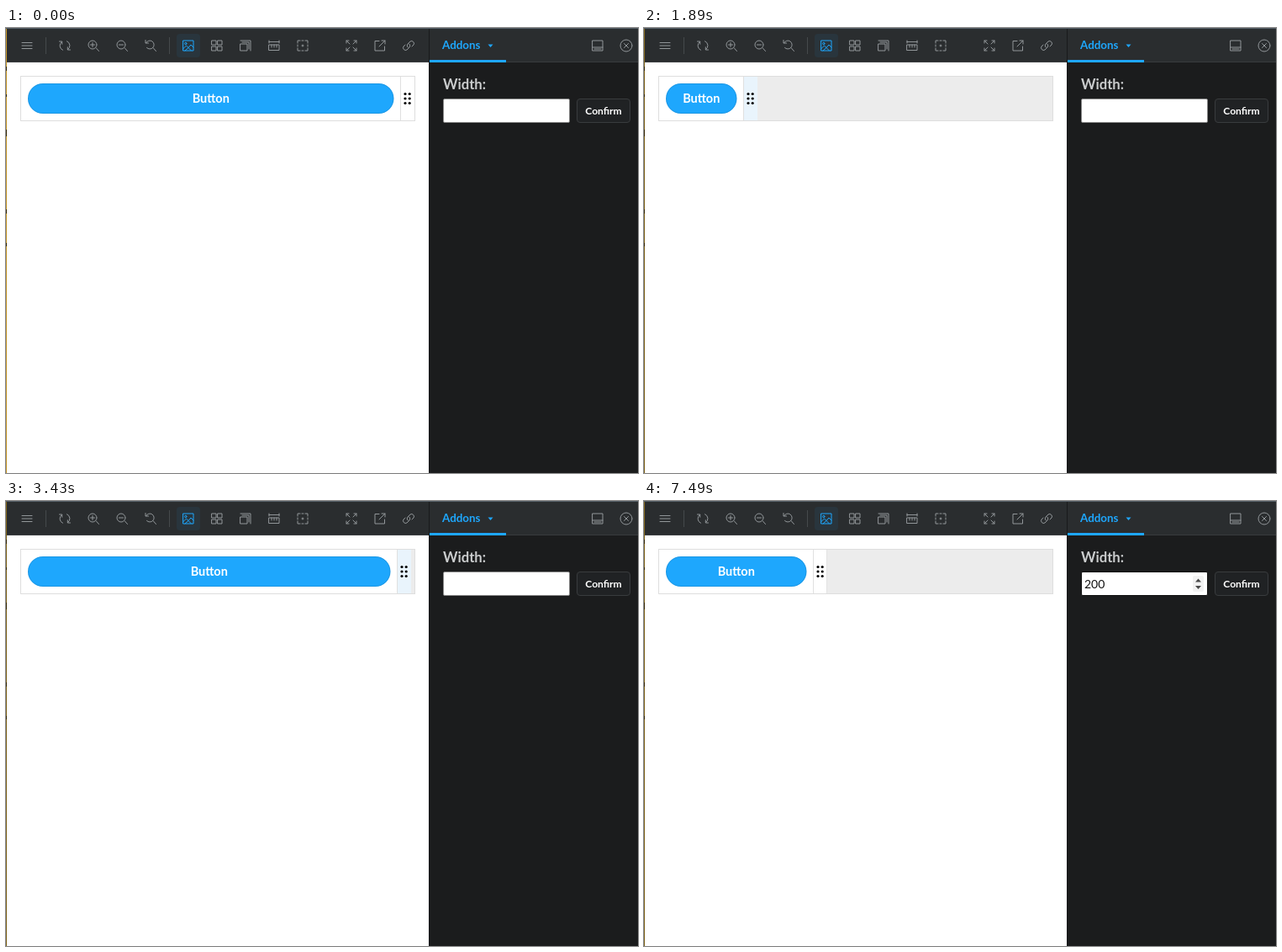
These frames come from a looping animation (752x530 px, 8000 ms). An HTML page:

```html
<!DOCTYPE html>
<html lang="en">
<head>
<meta charset="utf-8">
<title>Resizable button</title>
<style>
  html, body { margin: 0; width: 100%; height: 100%; overflow: hidden; background: #1b1c1d; }
  svg { display: block; width: 752px; height: 530px; }
  text { font-family: Lato, "Open Sans", sans-serif; font-weight: 700; }
  .icon { fill: none; stroke: #92979a; stroke-width: 1; stroke-linecap: round; stroke-linejoin: round; }
  .active { stroke: #1ea7fd; }
</style>
</head>
<body>
<svg viewBox="0 0 752 530">
  <rect width="752" height="530" fill="#1b1c1d"/>
  <rect width="752" height="40" fill="#2a2d2f"/>
  <rect width="752" height="1" fill="#535d65"/>
  <rect x="503" y="40" width="249" height="1" fill="#383b3d"/>
  <rect y="41" width="503" height="489" fill="#fff"/>
  <rect y="40" width="503" height="1" fill="#3d4042"/>
  <rect x="503" y="1" width="1" height="529" fill="#181a1b"/>
  <g id="edge">
    <rect id="strip" y="1" width="1" height="529"/>
    <path d="M.5 46v5m0 28v3m0 39v8m0 87v5m0 35v4" stroke="#3a2c08"/>
  </g>

  <path d="M47.500 11v20M194.500 11v20" stroke="#45494c"/>
  <rect x="203" y="7" width="28" height="28" rx="4" fill="#1ea7fd" fill-opacity=".07"/>
  <g id="icons"></g>

  <text x="519" y="25" font-size="13.400" fill="#1ea7fd">Addons</text>
  <path d="M573.500 19.500h6l-3 3.500z" fill="#1ea7fd"/>
  <rect x="504" y="38" width="91" height="3" fill="#1ea7fd"/>
  <text x="520" y="73" font-size="16.700" fill="#cbcdce">Width:</text>

  <rect x="17.500" y="57.500" width="469" height="53" fill="#ececec" stroke="#dedede"/>
  <rect id="box" x="18" y="58" height="52" fill="#fff"/>
  <g id="handle">
    <rect id="grip" x=".5" y="58" width="16.500" height="52"/>
    <path d="M.5 58v52" stroke="#e0e0e0"/>
    <path id="gripEnd" d="M16.500 58v52" stroke="#e2e2e2"/>
    <g id="dots"></g>
  </g>
  <rect id="button" x="26" y="66" height="36" rx="18" fill="#1ea7fd"/>
  <rect id="buttonRim" x="26.500" y="66.500" height="35" rx="17.500" fill="none" stroke="#000" stroke-opacity=".1"/>
  <text id="label" y="89" font-size="14.500" font-weight="800" fill="#fff" text-anchor="middle">Button</text>

  <rect id="field" x="520.500" y="84.500" width="150" height="28" rx="1.500" fill="#fff"/>
  <g id="spinner">
    <rect x="653" y="89" width="13" height="19" rx="2" fill="#f2f2f2"/>
    <path d="M656 96.500l3.500-4 3.500 4zM656 101l3.500 4 3.500-4z" fill="#4a4a4a"/>
  </g>
  <text id="value" x="524" y="103.500" font-size="14" style="font-weight:400" fill="#111"></text>
  <path id="caret" d="M.5 90v18" stroke="#000"/>
  <path id="beam" d="M607.500 94.500q3 0 3 2q0-2 3-2M610.500 96v12M607.500 109q3 0 3-2q0 2 3 2M609 103.500h3" fill="none" stroke="#111" stroke-width="1.200"/>

  <rect x="679.500" y="84.500" width="63" height="28" rx="3.500" fill="#202224" stroke="#393c3e"/>
  <text x="711" y="103" font-size="12.100" fill="#fff" text-anchor="middle">Confirm</text>
</svg>
<script>
const LOOP = 8000, TICK = 70;
const $ = id => document.getElementById(id);
const set = (id, attrs) => Object.entries(attrs).forEach(([k, v]) => $(id).setAttribute(k, v));
const show = (id, on) => set(id, { visibility: on ? 'visible' : 'hidden' });

// Toolbar icons, each drawn around its own centre.
const lens = 'M3.200 2.800L6.500 6.500M4-1A5 5 0 1 1-6-1A5 5 0 1 1 4-1';
const square = (x, y, s) => `M${x} ${y}h${s}v${s}h${-s}z`;
const icons = [
  [25, 'M-6-3.500H6M-6 0H6M-6 3.500H6'],
  [70, 'M-2.500 5.300A5.800 5.800 0 0 1-3.500-4.700M-6.500-5h3.200v3.200M2.500-5.300A5.800 5.800 0 0 1 3.500 4.700M6.500 5H3.300V1.800'],
  [104, lens + 'M-3.500-1H1.500M-1-3.500V1.500'],
  [138, lens + 'M-3.500-1H1.500'],
  [172, 'M3.200 2.800L6.500 6.500M-5.400-3.200A5 5 0 1 1-4.500 2.500M-6-6.500v3.500h3.500'],
  [217, square(-6, -6, 12) + 'M-6 3.500L-2.500 0L0 2.500L3-1L6 2M-2-2.500a1.200 1.200 0 1 1-2.400 0a1.200 1.200 0 1 1 2.400 0M-4 6L0 2.500L3.500 6'],
  [251, [[-6, -6], [1, -6], [-6, 1], [1, 1]].map(([x, y]) => square(x, y, 5)).join('')],
  [285, square(-6, -2, 8) + 'M-4-4H4V4M-6-6H6V6'],
  [319, 'M-6-1H6V5.500H-6zM-3-1V2M0-1V2M3-1V2M-6-6v3M6-6v3M-6-4.500H6'],
  [353, 'M-6-3V-6H-3M3-6H6V-3M6 3V6H3M-3 6H-6V3M-1-6H1M-1 6H1M-6-1V1M6-1V1M-1 0H1M0-1V1'],
  [411, 'M-6-3V-6H-3M-6-6L-2-2M3-6H6V-3M6-6L2-2M6 3V6H3M6 6L2 2M-3 6H-6V3M-6 6L-2 2'],
  [445, 'M-1-5.500H-6V6H5.500V1M2-6H6V-2M6-6L-1 1'],
  [479, 'M-1 2A3 3 0 0 1-1-2L2-5A2.900 2.900 0 0 1 6-1L4 1M1-2A3 3 0 0 1 1 2L-2 5A2.900 2.900 0 0 1-6 1L-4-1'],
  [704, 'M-6-6H6V6H-6zM-6 2H6M-4 4H4'],
  [738, 'M7 0A7 7 0 1 1-7 0A7 7 0 1 1 7 0M-2.500-2.500L2.500 2.500M2.500-2.500L-2.500 2.500']
];
$('icons').innerHTML = icons.map(([x, d]) =>
  `<path class="icon${x === 217 ? ' active' : ''}" transform="translate(${x} 21)" d="${d}"/>`).join('');
$('dots').innerHTML = [78.5, 84, 89.5].map(y =>
  [6, 11.2].map(x => `<circle cx="${x}" cy="${y}" r="1.6"/>`).join('')).join('');

const dragBack = [[2450, 118], [2590, 150], [2730, 210], [3150, 410], [3290, 450], [3430, 465]];

function along(points, t) {
  const i = points.findIndex(p => p[0] >= t);
  if (i < 0) return points[points.length - 1][1];
  if (i === 0) return points[0][1];
  const [[t0, a], [t1, b]] = [points[i - 1], points[i]];
  return a + (b - a) * (t - t0) / (t1 - t0);
}

function handleX(t) {
  if (t >= 7490) return 201;
  if (t >= 2450) return along(dragBack, t);
  const u = Math.min(1, Math.max(0, (t - 1120) / 770));
  return 469 - 351 * (1 - (1 - u) ** 1.5);
}

function draw(time) {
  const t = Math.floor((time % LOOP + 0.01) / TICK) * TICK;
  const x = handleX(t), width = x - 33.5;
  const dragging = t >= 1050 && t < 3850;
  const hover = t >= 4130, focus = t >= 4970;

  set('strip', { fill: t < 560 ? '#c4962a' : '#80651c' });
  set('box', { width: x - 18 });
  set('handle', { transform: `translate(${x})` });
  set('grip', { fill: dragging ? '#e9f4fc' : '#fff' });
  show('gripEnd', x < 469 && !dragging);
  set('button', { width });
  set('buttonRim', { width: width - 1 });
  set('label', { x: 26 + width / 2 });

  const typed = '200'.slice(0, [6580, 6790, 6930].filter(at => t >= at).length);
  const blinkOn = t >= 5040 && t < 5530 || t >= 6020 && t < 7490;
  set('field', { stroke: focus ? '#101010' : hover ? '#4f4f4f' : '#858585' });
  show('spinner', hover);
  $('value').textContent = typed;
  set('caret', { transform: `translate(${524 + typed.length * 8.1})` });
  show('caret', blinkOn);
  show('beam', t >= 5250 && t < 6580);
}

const start = performance.now();
function frame() {
  draw(performance.now() - start);
  requestAnimationFrame(frame);
}
frame();
</script>
</body>
</html>
```
